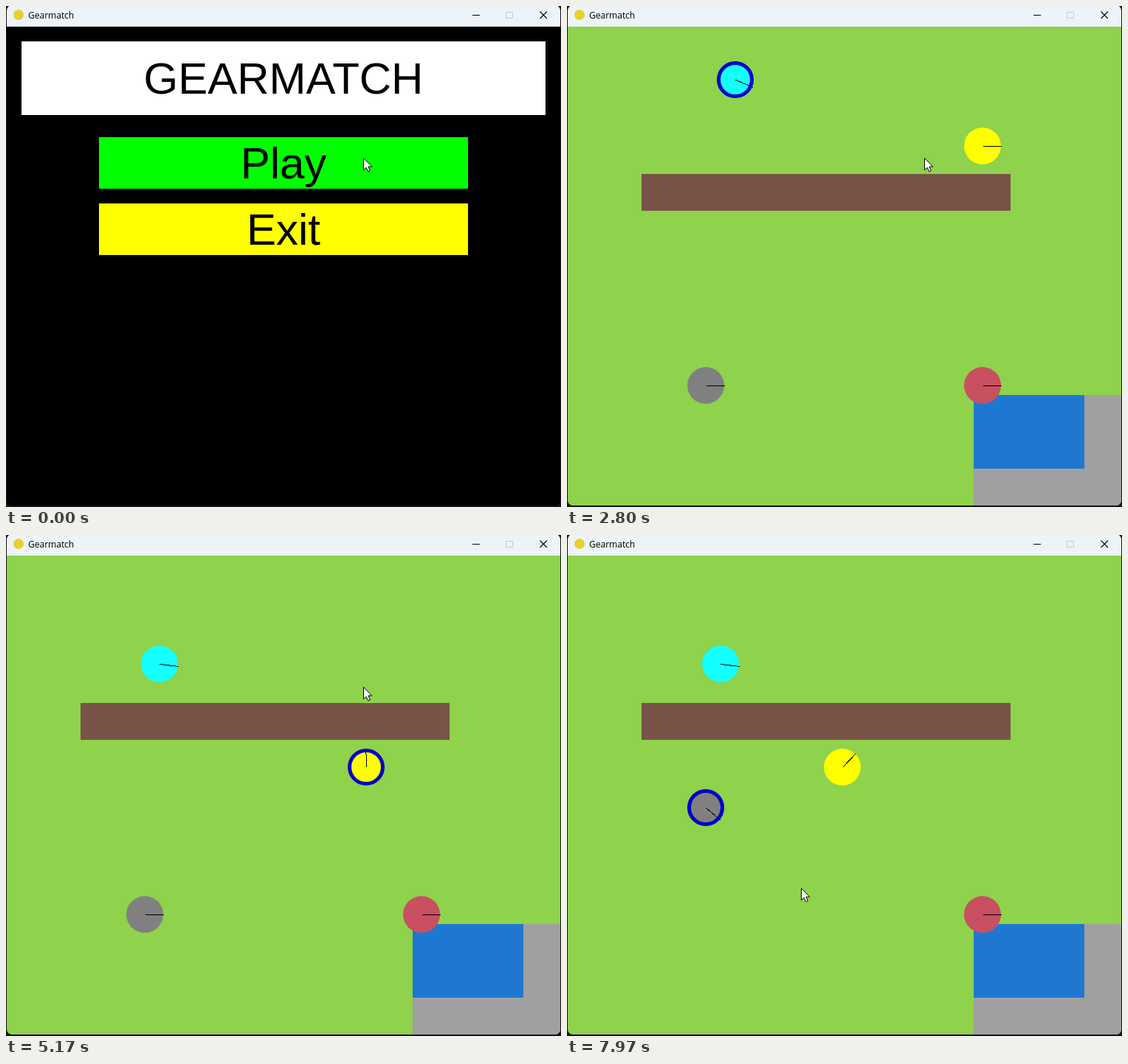
An HTML page for the animation above (8000 ms loop, 752 by 680 pixels).

```html
<!DOCTYPE html>
<html lang="en">
<head>
<meta charset="utf-8">
<title>Gearmatch</title>
<style>
  html, body { margin: 0; width: 100%; height: 100%; overflow: hidden; background: #141410; }
  svg { display: block; }
  .caption { font: 12px "Open Sans", sans-serif; }
  .big { font: 60px "Liberation Sans", Arial, sans-serif; text-anchor: middle; }
  .crisp { shape-rendering: crispEdges; }
</style>
</head>
<body>
<svg width="752" height="680" viewBox="0 0 752 680">
  <defs>
    <clipPath id="window"><rect x="1" y="-1" width="750" height="679" rx="7"/></clipPath>
  </defs>
  <rect width="752" height="680" fill="#141410"/>
  <g clip-path="url(#window)">
    <rect width="752" height="28" fill="#ecf3f9"/>
    <g id="menu">
      <rect y="28" width="752" height="652"/>
      <rect x="21" y="48" width="710" height="100" fill="#fff"/>
      <rect x="126" y="178" width="500" height="70" fill="#0f0"/>
      <rect x="126" y="268" width="500" height="70" fill="#ff0"/>
      <g class="big">
        <text x="376" y="119">GEARMATCH</text>
        <text x="376" y="234">Play</text>
        <text x="376" y="324">Exit</text>
      </g>
    </g>
    <g id="game">
      <rect y="28" width="752" height="652" fill="#8fd24c"/>
      <rect x="101" y="228" width="500" height="50" fill="#795248"/>
      <rect x="551" y="528" width="200" height="150" fill="#a0a0a0"/>
      <rect x="551" y="528" width="150" height="100" fill="#1e78d2"/>
      <g id="robots"></g>
    </g>
    <circle cx="17" cy="12" r="7" fill="#e8d030"/>
    <text class="caption" x="30" y="17">Gearmatch</text>
    <g fill="none" stroke="#000">
      <path d="M632 12.5h10"/>
      <path d="M677.5 8.5h9v8h-9z" stroke="#c4cace"/>
      <path d="M723.5 7.5l9.5 9.5m0-9.5l-9.5 9.5" stroke-width="1.1"/>
    </g>
  </g>
  <path id="cursor" d="M0 0V16.2L3.7 12.8L6.2 18.3L8.8 17.2L6.4 11.6H11.3Z" fill="#fff" stroke="#000"/>
</svg>
<script>
const LOOP = 8000, GAME_START = 600, STEP = 100 / 3, GRID = 5;
const $ = id => document.getElementById(id);

// Keys are [time, x, y].
function along(keys, t, ease = k => k) {
  if (t <= keys[0][0]) return keys[0].slice(1);
  for (let i = 1; i < keys.length; i++) {
    const [t0, x0, y0] = keys[i - 1], [t1, x1, y1] = keys[i];
    if (t < t1) {
      const k = ease((t - t0) / (t1 - t0));
      return [x0 + (x1 - x0) * k, y0 + (y1 - y0) * k];
    }
  }
  return keys.at(-1).slice(1);
}

const smooth = k => k * k * (3 - 2 * k);
const mouseKeys = [
  [5400, 485, 207], [5500, 498, 193], [5600, 487, 195],
  [6467, 487, 195], [7030, 315, 489], [7467, 315, 489], [7967, 318, 480]
];
const mouseAt = t => along(mouseKeys, t, smooth);

// Each robot is steered from `on` to `off` and faces the mouse meanwhile.
// All run at about 0.29 px per ms on each axis; overlapping keys give diagonals.
const robots = [
  { color: '#14ffff', on: GAME_START, off: 3800, keys: [
    [1867, 188, 190], [2167, 275, 190], [2230, 293, 175], [2290, 308, 158],
    [2490, 308, 100], [2533, 308, 100], [2700, 258, 100], [2870, 208, 100], [3130, 208, 175]] },
  { color: '#ff0', on: 3800, off: 6170, keys: [
    [4567, 563, 190], [4910, 563, 289], [5000, 537, 315], [5570, 373, 315]] },
  { color: '#808080', on: 6170, off: LOOP, keys: [[7467, 188, 515], [7965, 188, 370]] },
  { color: '#c85060', on: LOOP, off: LOOP, keys: [[0, 563, 515]] }
];

function add(parent, tag, attributes) {
  const node = document.createElementNS('http://www.w3.org/2000/svg', tag);
  for (const name in attributes) node.setAttribute(name, attributes[name]);
  return parent.appendChild(node);
}

for (const robot of robots) {
  robot.node = add($('robots'), 'g', {});
  add(robot.node, 'circle', { r: 25, fill: robot.color });
  robot.line = add(robot.node, 'line', { class: 'crisp', x1: .5, y1: .5, stroke: '#000' });
  robot.ring = add(robot.node, 'circle', { r: 22.5, fill: 'none', stroke: '#0000c8', 'stroke-width': 5 });
}

function place(robot, t) {
  const snap = v => Math.round(v / GRID) * GRID;
  const [startX, startY] = robot.keys[0].slice(1);
  const [px, py] = along(robot.keys, t);
  const x = startX + snap(px - startX), y = startY + snap(py - startY);
  let angle = 0;
  if (t >= robot.on) {
    const [mx, my] = mouseAt(Math.min(t, robot.off));
    angle = Math.atan2(my - y, mx - x);
  }
  robot.node.setAttribute('transform', `translate(${x} ${y})`);
  robot.line.setAttribute('x2', .5 + 25.5 * Math.cos(angle));
  robot.line.setAttribute('y2', .5 + 25.5 * Math.sin(angle));
  robot.ring.style.display = t >= robot.on && t < robot.off ? '' : 'none';
}

function draw(t) {
  const playing = t >= GAME_START;
  $('menu').style.display = playing ? 'none' : '';
  $('game').style.display = playing ? '' : 'none';
  const [mx, my] = mouseAt(t).map(Math.round);
  $('cursor').setAttribute('transform', `translate(${mx - .5} ${my - .5})`);
  robots.forEach(robot => place(robot, t));
}

const start = performance.now();
function tick() {
  const t = (performance.now() - start) % LOOP;
  // Thirty steps a second; the small lead covers step times rounded to 10 ms.
  const step = Math.floor((t + 3.5) / STEP);
  draw(Math.round(step * STEP));
  requestAnimationFrame(tick);
}
tick();
</script>
</body>
</html>
```
